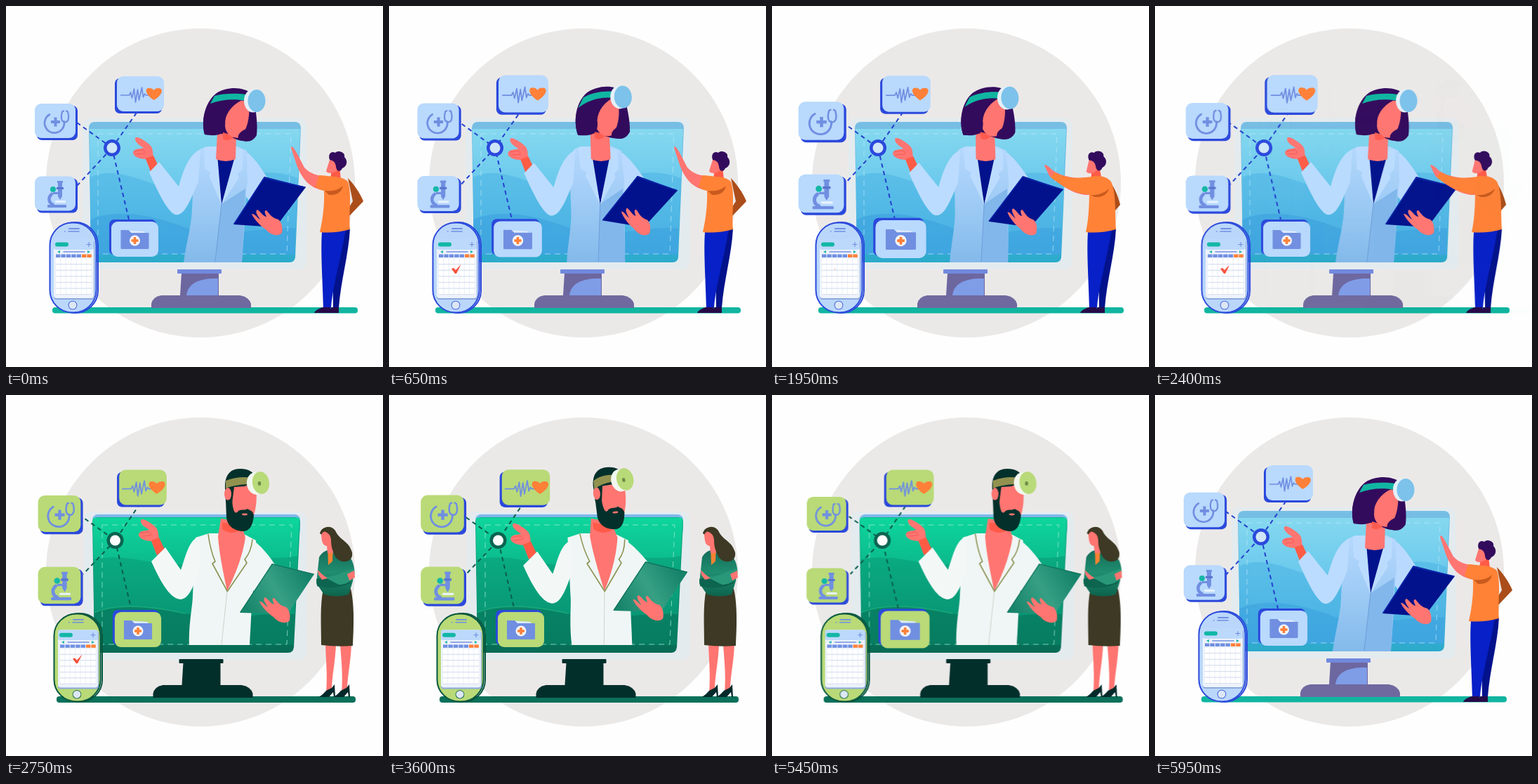
Recreate the animation shown at these times as an HTML page with a canvas. Size 537x514 px, loop 6 s.

```html
<!DOCTYPE html>
<html lang="en">
<head>
<meta charset="utf-8">
<title>Online doctor</title>
<style>
html, body { margin: 0; width: 100%; height: 100%; overflow: hidden; background: #fefefe; }
canvas { display: block; width: 537px; height: 514px; }
</style>
</head>
<body>
<canvas id="stage" width="537" height="514"></canvas>
<script>
const W = 537, H = 514, LOOP = 6000;
const stage = document.getElementById('stage').getContext('2d');
const layer = document.createElement('canvas');
layer.width = W; layer.height = H;
const c = layer.getContext('2d');

const clamp = v => Math.max(0, Math.min(1, v));
const ease = p => p * p * (3 - 2 * p);
const ramp = (t, a, b) => ease(clamp((t - a) / (b - a)));
const mod = (a, b) => ((a % b) + b) % b;
const pulse = (t, period) => Math.sin(Math.PI * t / period) ** 2;

// Blend two path strings that share one structure.
function morph(a, b, q) {
  const n = b.match(/-?[\d.]+/g);
  let i = 0;
  return a.replace(/-?[\d.]+/g, v => (+v + (n[i++] - v) * q).toFixed(2));
}
function grad(y0, y1, ...colors) {
  const g = c.createLinearGradient(0, y0, 0, y1);
  colors.forEach((k, i) => g.addColorStop(i / (colors.length - 1), k));
  return g;
}
function shape(fill, d) { c.fillStyle = fill; c.fill(new Path2D(d)); }
function line(color, w, d) {
  c.strokeStyle = color; c.lineWidth = w;
  c.lineCap = c.lineJoin = 'round';
  c.stroke(new Path2D(d));
}
function box(fill, x, y, w, h, r = 0) {
  c.fillStyle = fill; c.beginPath(); c.roundRect(x, y, w, h, r); c.fill();
}
function oval(fill, x, y, rx, ry = rx, rot = 0) {
  c.fillStyle = fill; c.beginPath(); c.ellipse(x, y, rx, ry, rot, 0, 7); c.fill();
}
function group(draw, ...m) {
  c.save();
  if (m.length) c.transform(...m);
  draw(); c.restore();
}
const shift = (dx, dy, draw) => group(draw, 1, 0, 0, 1, dx, dy);
function turn(x, y, deg, draw, dx = 0, dy = 0) {
  c.save();
  c.translate(x + dx, y + dy); c.rotate(deg * Math.PI / 180); c.translate(-x, -y);
  draw(); c.restore();
}

const ICON = '#708fe1', ORANGE = '#ff8038', SKIN = '#ff7571', EDGE = '#2b49dc';

const icons = {
  scope() {
    line(ICON, 2.6, 'M-8 -9 A14 14 0 1 0 13 3 L13 1');
    line(ICON, 2.2, 'M10 -13 C8 -6 8 1 14 2 C20 1 20 -6 18 -13 M10 -13 L12 -14 M18 -13 L16 -14');
    box(ICON, -6, -.5, 13, 4); box(ICON, -1.5, -5, 4, 13);
  },
  lens() {
    line(ICON, 4.5, 'M-5 1 C-10 5 -10 13 -3 16');
    box(ICON, -11, 16, 27, 4, 1);
    box('#e8f2fd', 0, 10, 15, 3, 1);
    shape(ICON, 'M3 -18 H11 V-15 H10 V4 L7 9 L4 4 V-15 H3 Z');
    box('#5875cf', 2, -9, 10, 3); box(ICON, -3, -2, 8, 3);
    oval('#14b8a6', -3, -6, 4);
  },
  heart() {
    line(ICON, 1.7, 'M-28 2 H-16 L-14 -2 L-12 6 L-9 -7 L-7 12 L-4 -6 L-2 9 L2 -9 L4 5 L6 0 L8 2 H12');
    shape(ORANGE, 'M19 9 C4 -1 7 -10 14 -8 Q17 -8 19 -5 Q21 -8 25 -8 C33 -9 33 1 19 9 Z');
  },
  folder() {
    shape('#dceafa', 'M-16 -13 L14 -11 V8 H-16 Z');
    shape(ICON, 'M-20 -13 H-9 L-5 -9 H20 V13 Q20 14 18 14 H-19 Q-20 14 -20 13 Z');
    oval('#f4f7fd', 0, 2, 7.5);
    box(ORANGE, -5, .2, 10, 3.6); box(ORANGE, -1.8, -3, 3.6, 10);
  }
};

function card(icon, x, y, w, h, sx, sy, size, fill) {
  group(() => {
    box(EDGE, -w / 2 + sx, -h / 2 + sy, w, h, 7);
    box(fill, -w / 2, -h / 2, w, h, 9);
    icons[icon]();
  }, size, 0, 0, size, x, y);
}

function links(x, y, ends, color, ring, core, t) {
  c.setLineDash([6, 5]); c.lineDashOffset = -t * .022;
  c.lineCap = 'butt'; c.strokeStyle = color; c.lineWidth = 2;
  for (const [ex, ey] of ends) {
    c.beginPath(); c.moveTo(ex, ey); c.lineTo(x, y); c.stroke();
  }
  c.setLineDash([]);
  oval(ring, x, y, 12); oval(core, x, y, 7.5);
}

function phone(x, y, tall, body, edge, from, to) {
  group(() => {
    c.strokeStyle = edge; c.lineWidth = 2;
    c.beginPath(); c.roundRect(5, 0, 64, 129, 32); c.stroke();
    box(body, 0, 0, 67, 129, 33);
    c.beginPath(); c.roundRect(.5, .5, 66, 128, 32); c.stroke();
    line(ICON, 1.8, 'M28 9 H42'); line(ICON, 1.6, 'M27 13 H42 M21.5 13 H22');
    box('#8ca9dc', 6, 25, 58, 85, 4);
    box('#edf2fb', 6, 24, 57, 84, 4);
    box('#bcd9fb', 6, 24, 57, 15, 3);
    box('#12b7a5', 8, 28.5, 19, 6, 3);
    line(ICON, 1.2, 'M56 28.5 V34.5 M53 31.5 H59');
    line(ICON, 1.5, 'M20 42 H50');
    shape('#12b7a5', 'M11 42 L15 40 V44 Z M58 42 L54 40 V44 Z');
    for (let i = 0; i < 7; i++) {
      const cx = 9 + i * 7.4;
      box(i > 4 ? ORANGE : ICON, cx, 45.5, 6.4, 4.5);
      for (let j = 0; j < 6; j++) box('#fff', cx, 52 + j * 8.6, 6.2, 7.2, 1);
    }
    c.strokeStyle = '#d3dbe8'; c.lineWidth = .8;
    for (let j = 1; j < 7; j++) {
      c.beginPath(); c.moveTo(9, 51 + j * 8.6); c.lineTo(60, 51 + j * 8.6); c.stroke();
    }
    if (to > from) group(() => {
      c.beginPath(); c.rect(26 + from * 16, 55, (to - from) * 16, 22); c.clip();
      shape('#f7503c', 'M27 66 L30 65 L33 68 L40.5 60 L34 73 L32 73 Z');
    });
    oval(edge, 33, 118, 6.3); oval('#dce7f3', 33, 118, 5.5);
  }, 1, 0, 0, tall, x, y);
}

function stand(x, y, bar, neck, base, shine) {
  shift(x, y, () => {
    shape(base, 'M0 18 V12 Q2 2 14 0 H126 Q139 2 142 12 V18 Z');
    shape(neck, 'M43 -32 H96 V0 H41 Z');
    if (shine) shape(shine, 'M95 -24 C70 -25 52 -18 50 0 H95 Z');
    box(bar, 37, -37, 63, 6, 1);
  });
}

function inset(d, color) {
  c.setLineDash([8, 6]); c.lineDashOffset = 0;
  c.strokeStyle = color; c.lineWidth = 1;
  c.stroke(new Path2D(d));
  c.setLineDash([]);
}

const POINT = 'M184 188 C187 184 200 193 206 199 C210 204 209 212 210 216 L218 230 L207 238 L199 218 C190 218 180 214 181 208 C184 202 190 204 196 202 C190 198 183 194 184 188 Z';
const GRIP = 'M350 296 C354 295 358 302 362 304 C358 298 354 292 358 290 C363 293 367 300 371 300 C369 295 367 291 371 291 C376 297 379 302 388 304 C394 309 394 318 393 323 C388 329 376 326 370 318 C362 313 353 303 350 296 Z';

function pointHand() {
  shape(SKIN, POINT);
  shape('#ff5b45', 'M199 217 L210 213 L218 230 L207 238 Z');
  line('#f45c58', 1, 'M183 207 L194 205 Q200 207 198 210 L186 211');
}

// The torso leans from the hem, so the shift grows with height.
function lean(q, draw) {
  const k = 22 * q / 162;
  group(draw, 1, 0, k, 1, -k * 362, 0);
}

function womanDoctor(q) {
  lean(q, () => {
    shape('#b9dafe', 'M336 204 C350 210 362 228 374 248 L358 292 L339 268 Z');
    shape(grad(200, 364, '#b6d8fd', '#9ecbf5', '#83baeb'), 'M276 204 L286 200 H330 L343 206 L344 250 C340 275 342 295 336 365 H253 C257 335 264 315 265 290 L268 220 Z');
    shape('#82b7eb', 'M307 282 L341 260 L336 365 H297 Z');
    line('#6f9edc', 1, 'M307 282 L298 364');
    shape('#02128c', 'M299 214 H327 L307 283 Z');
    shape('#bcdcff', 'M282 201 L300 200 L307 283 L289 241 L292 237 L283 232 Z');
    shape('#bcdcff', 'M326 203 L338 205 L337 232 L330 239 L332 244 L307 283 L325 218 Z');
    shape(SKIN, 'M301 181 L328 178 L327 218 Q313 224 299 218 Z');
  });
  shift(-20 * q, 2 * q, () => {
    pointHand();
    shape('#bbdcff', 'M277 204 C260 211 252 236 246 257 L218 222 L204 237 C216 264 230 293 241 297 C255 300 264 273 274 250 Z');
  });
  turn(318, 155, -8 * q, () => {
    shape('#330b5d', 'M283 183 C277 160 285 135 300 124 C314 115 339 114 351 126 C356 145 359 169 357 184 C352 194 337 194 326 189 L309 182 Z');
    shift(-4 * q, 0, () => {
      shape('#ff5c50', 'M309 180 L326 185 Q316 195 309 189 Z');
      shape(SKIN, 'M313 145 C318 133 341 131 346 140 C348 160 342 180 333 187 C323 190 312 182 312 170 Z');
    });
    shape('#330b5d', 'M283 183 C277 160 285 138 300 134 L341 132 C325 138 314 150 312 164 C313 174 309 182 303 183 C296 185 290 184 283 183 Z');
    shape('#330b5d', 'M348 148 C349 160 348 169 342 175 C332 179 327 187 334 191 C350 197 359 187 355 176 Z');
    shift(-10 * q, -2 * q, () => {
      shape('#10b6a2', morph('M297 128 C310 124 329 124 342 126 L341 135 C325 132 307 133 291 139 Z',
        'M303 134 C313 127 329 124 342 126 L341 135 C325 132 307 137 293 150 Z', q));
      oval('#e4f0f7', 352, 135, 13, 16.5); oval('#7cc2eb', 357, 135, 12.5, 16);
    });
  }, -28 * q, -3 * q);
  turn(376, 282, 9.5 * q, () => {
    shape('#02128c', 'M368 243 L427 258 L384 315 L324 311 Z');
    line('#0d27ad', 1.4, 'M369 245 L426 258 M368 244 L325 310');
    shape(SKIN, GRIP);
  }, -31 * q, -q);
}

function manDoctor(q) {
  lean(q, () => {
    shape('#f0f6f5', 'M346 203 C362 212 376 230 386 246 L365 293 L345 270 Z');
    shape('#f0f6f5', 'M270 203 L289 197 H337 L356 207 L357 250 C349 285 350 315 347 356 H261 C260 325 266 300 266 285 Z');
    shape(SKIN, 'M306 176 L334 180 L341 203 C336 235 323 263 315 279 C309 252 303 220 302 201 Z');
    shape('#ff5a49', 'M308 181 L333 187 L333 193 Q320 200 308 191 Z');
    line('#8d9254', 1.6, 'M288 198 Q291 221 298 237 L294 240 L315 279');
    line('#8d9254', 1.6, 'M351 206 Q349 224 340 234 L343 239 L315 280');
    line('#c9d5cc', 1, 'M315 280 L307 355');
  });
  shift(-22 * q, 8 * q, () => {
    shift(8, -10, pointHand);
    shape('#f3f8f7', 'M275 202 C260 205 255 234 249 249 L227 217 L207 237 C219 263 232 289 248 291 C261 291 268 270 276 248 Z');
  });
  turn(322, 190, -7 * q, () => {
    shape(SKIN, 'M316 128 H355 C359 146 356 170 348 181 L322 179 Z');
    shape('#03302b', 'M312 133 C311 116 318 105 333 105 C347 105 356 111 356 122 L340 130 L325 131 L322 154 L313 152 Z');
    oval(SKIN, 316, 141, 5, 9);
    shape('#03302b', 'M313 150 L322 149 C323 164 326 172 331 165 C335 162 341 165 344 162 C348 165 351 164 353 171 C352 184 348 193 339 194 C326 194 315 187 314 174 Z');
    oval(SKIN, 340, 170, 4, 1.4);
    shift(-7 * q, -q, () => {
      shape('#92924f', morph('M313 122 C326 117 339 116 350 118 V127 C338 127 325 128 313 133 Z',
        'M320 124 C328 117 339 116 350 118 V127 C338 127 328 130 320 136 Z', q));
      oval('#f2f8ef', 356, 126, 13, 16, -.15); oval('#b9da79', 363, 125, 12, 16, -.15);
      oval('#6f8c45', 361, 126, 2.3, 3);
    });
  }, -22 * q, -2 * q);
  shift(-19 * q, -4 * q, () => {
    const g = c.createLinearGradient(340, 300, 425, 250);
    g.addColorStop(0, '#18856b'); g.addColorStop(.5, '#37a084'); g.addColorStop(1, '#15836a');
    shape(g, 'M379 240 L439 255 L401 312 L333 310 Z');
    line('#0a7059', 1.2, 'M380 241 L438 255 M379 241 L334 309');
    shift(11, -2, () => shape(SKIN, GRIP));
  });
}

function visitor(r) {
  shape('#ab4d1a', morph('M487 245 C494 252 505 267 509 278 L489 299 L484 294 L494 278 Z',
    'M484 254 C489 261 494 274 496 283 L489 291 L483 287 L487 278 Z', r));
  shape('#03128b', 'M466 322 L490 317 C488 355 477 390 474 430 H466 L465 360 Z');
  shape('#0720c7', 'M450 322 L484 318 C477 360 465 400 463 430 H452 C451 390 448 350 450 322 Z');
  shape('#260a48', 'M451 429 H462 V437 H439 Q441 432 451 429 Z M464 429 H474 V437 H460 Q460 432 464 429 Z');
  turn(468, 240, -4 * r, () => {
    shape('#ff5b47', 'M464 231 L475 229 L477 247 H462 Z');
    shape(SKIN, 'M461 219 C467 214 475 218 475 228 C472 239 458 240 456 235 Z');
    shape('#330b5d', 'M461 219 C458 210 464 206 469 209 C474 204 484 209 482 215 C488 221 485 229 479 231 C476 238 470 235 470 228 Q469 220 461 219 Z');
  }, -8 * r);
  shape('#ff8236', morph('M452 249 C460 239 480 243 487 250 C493 268 488 295 490 318 Q468 324 447 322 C452 300 455 275 452 249 Z',
    'M452 249 C460 239 475 241 483 250 C491 268 488 295 490 318 Q468 324 447 322 C452 300 452 275 452 249 Z', r));
  shape('#c95a1e', morph('M454 263 C465 264 474 262 480 256 Q477 270 460 269 Z',
    'M454 269 C464 270 474 266 480 260 Q476 273 460 272 Z', r));
  shape(SKIN, morph('M406 202 C407 197 411 204 414 209 L425 230 C433 239 444 242 458 243 L457 263 C437 262 421 250 412 220 Z',
    'M388 227 C389 224 396 230 401 235 L411 240 C424 244 434 246 447 244 L452 269 C432 270 414 257 395 242 Z', r));
  shape('#ff8236', morph('M446 241 C458 242 472 242 480 249 C482 257 471 264 453 263 C447 262 444 259 441 257 Z',
    'M402 237 C424 247 438 246 460 242 C474 244 482 253 474 264 C449 274 426 266 397 244 Z', r));
}

function visitorB(r) {
  shape(SKIN, 'M455 355 H470 C469 382 464 400 464 421 L456 424 C458 400 456 382 455 355 Z');
  shape(SKIN, 'M476 355 H492 C491 382 486 400 486 421 L478 424 C480 400 478 382 476 355 Z');
  for (const x of [0, 21]) shape('#03292a', `M${456 + x} 421 L${464 + x} 417 L${468 + x} 412 L${469 + x} 430 H${467 + x} L${466 + x} 423 L${460 + x} 430 H${446 + x} Q${451 + x} 427 ${456 + x} 421 Z`);
  shape('#3d3924', 'M452 276 H491 C497 300 495 335 494 357 Q472 359 449 356 C449 325 447 300 452 276 Z');
  shape(grad(220, 285, '#136c58', '#208d70', '#0d654e'), 'M446 231 C451 221 462 219 470 220 C484 222 494 231 496 247 L494 265 L488 284 Q471 289 453 284 L442 268 Z');
  shape('#3d3924', morph('M447 197 C449 187 463 184 469 193 C476 208 488 207 493 224 C495 237 482 240 474 235 C466 230 466 219 461 208 Z',
    'M461 204 C464 184 481 181 488 192 C492 207 496 212 498 227 C499 242 487 245 480 240 C471 232 469 224 460 220 Z', r));
  shift(8 * r, 0, () => shape('#f58233', 'M458 212 L466 215 L465 237 L459 242 Z'));
  shape(SKIN, morph('M449 199 C453 191 461 194 464 203 L466 225 H458 L457 215 C450 214 450 208 449 199 Z',
    'M466 196 C468 188 477 189 480 197 L477 214 H469 L469 211 C466 208 465 204 466 196 Z', r));
  shape('#3d3924', morph('M450 193 C458 186 469 191 469 204 C473 217 481 225 477 235 C466 229 463 217 463 207 C463 199 458 195 450 193 Z',
    'M467 191 C475 183 485 188 487 202 C490 217 493 227 489 238 C478 231 477 218 479 207 C481 198 476 190 467 191 Z', r));
  shape('#0d654f', 'M442 262 C454 259 470 263 488 258 L491 268 C475 275 458 277 443 272 Z');
  shape('#289879', 'M449 257 C464 263 480 251 496 247 C499 261 488 270 474 270 Z');
  shape(SKIN, 'M444 249 L450 255 L458 261 L450 263 L445 256 Z');
  shift(5 * r, 3 * r, () => shape(SKIN, 'M486 255 L496 250 L497 260 L489 264 Z'));
}

function sceneA(t) {
  const q = ramp(t, 100, 1100) * (1 - ramp(t, 1600, 2250));
  const r = ramp(t, 680, 1450);
  box('#e3ebef', 109, 160, 319, 215, 10);
  shape(grad(165, 364, '#78bee4', '#55b7e0', '#2baacb'), 'M127 165 H411 Q420 165 420 174 L412 358 Q411 365 404 365 H130 Q122 365 121 357 L118 174 Q118 165 127 165 Z');
  group(() => {
    c.clip(new Path2D('M119 175 H419 L411 354 H121 Z'));
    box(grad(175, 354, '#85d8ef', '#67c7ec', '#46afe4'), 116, 175, 306, 182);
    shape('rgba(68,174,224,.45)', 'M116 245 C170 220 210 270 270 258 C330 244 375 225 422 248 V360 H116 Z');
    shape('rgba(56,157,222,.5)', 'M116 306 C160 285 215 300 260 317 C320 334 365 310 422 318 V360 H116 Z');
  });
  inset('M131 182 H406 L400 353 H131 Z', 'rgba(185,232,250,.7)');
  box('#10b5a0', 66, 429, 435, 8.5, 4);
  stand(207, 412, '#7189dd', '#6d67a0', '#70699f', '#7f9ce7');
  links(151, 202, [[101, 166], [101, 256], [186, 152], [175, 304]], '#2441ce', EDGE, '#cfe6f8', t);
  womanDoctor(q);
  const side = 1 + .13 * pulse(t, 750), fill = '#b9d9fd';
  const beat = mod(t, 1800) < 900 ? pulse(t, 900) : 0;
  card('scope', 70, 163.5, 58, 49, 3, 3, side, fill);
  card('lens', 70, 267, 58, 49, 3, 3, side, fill);
  card('heart', 191.5, 125, 67, 50, -3, 3, 1 + .1 * beat, fill);
  card('folder', 183.5, 332, 67, 50, -3, -3, 1 + .08 * pulse(t, 800), fill);
  const first = t < 1600;
  phone(62, 308, 1, '#bad7fb', EDGE, first ? ramp(t, 900, 1500) : 0,
    first ? ramp(t, 250, 650) : ramp(t, 1750, 2650));
  visitor(r);
}

function sceneB(t) {
  const q = ramp(t, 2950, 3950) * (1 - ramp(t, 4850, 5400));
  const r = ramp(t, 3850, 4500) * (1 - ramp(t, 4850, 5350));
  box('#e3ebef', 111, 166, 317, 211, 10);
  box('#80b8ec', 123, 170, 296, 30, 8);
  shape(grad(174, 366, '#0bb98b', '#0a896a', '#076b55'), 'M130 174 H412 Q419 174 419 182 L410 359 Q409 367 402 367 H134 Q126 367 126 360 L123 182 Q123 174 130 174 Z');
  group(() => {
    c.clip(new Path2D('M124 175 H418 L409 356 H126 Z'));
    box(grad(175, 356, '#0ed69d', '#0baf86', '#08836a'), 120, 175, 302, 184);
    shape('rgba(8,151,117,.5)', 'M120 235 C180 220 225 255 285 235 C330 220 370 240 422 228 V360 H120 Z');
    shape('rgba(7,112,86,.55)', 'M120 312 C155 295 205 300 255 311 C315 325 365 306 422 313 V360 H120 Z');
    line('rgba(31,178,127,.7)', 1.5, 'M120 312 C155 295 205 300 255 311');
  });
  inset('M137 185 H407 L400 355 H137 Z', 'rgba(160,235,204,.75)');
  box('#0b705a', 72, 429, 426, 9, 4);
  stand(209.5, 413, '#032f2b', '#032f2b', '#032f2b');
  links(155.5, 207, [[108, 173], [110, 255], [188, 159], [178, 303]], '#0b5d4e', '#0b6350', '#fbfdfc', t);
  manDoctor(q);
  const beat = pulse(t - 3225, 750), fill = '#b9da77';
  card('scope', 76, 169, 56, 48, 3, 3, 1 + .1 * beat, fill);
  card('lens', 76, 271, 57, 49, 3, 3, 1 + .08 * beat, fill);
  card('heart', 195, 131.5, 65, 48, -3, 3, 1 + .07 * pulse(t - 3000, 900), fill);
  card('folder', 188, 334, 66, 50, -3, -3, 1 + .08 * pulse(t - 3600, 800), fill);
  const first = t < 3700;
  phone(68, 311, .977, '#b9da77', '#07573f', first ? ramp(t, 3250, 3580) : ramp(t, 5200, 5480),
    first ? 1 : ramp(t, 3850, 4500));
  visitorB(r);
}

function show(draw, t, dx, alpha) {
  if (alpha <= 0) return;
  c.clearRect(0, 0, W, H);
  draw(t);
  stage.globalAlpha = alpha;
  stage.drawImage(layer, dx, 0);
  stage.globalAlpha = 1;
}

function frame(now) {
  const t = now % LOOP;
  stage.fillStyle = '#fefefe';
  stage.fillRect(0, 0, W, H);
  stage.fillStyle = '#ebe9e8';
  stage.beginPath(); stage.arc(277, 252, 220, 0, 7); stage.fill();

  const back = t > 4000;
  const p = clamp((t - (back ? 5407 : 2330)) / 400);
  const fade = ease(p) ** 2;
  const a = [sceneA, back ? t - LOOP : t], b = [sceneB, t];
  const [out, into] = back ? [b, a] : [a, b];
  show(...out, 130 * p * p, 1 - fade);
  show(...into, 130 * (1 - p) ** 2, fade);
}

const start = performance.now();
function tick() {
  frame(performance.now() - start);
  requestAnimationFrame(tick);
}
tick();
</script>
</body>
</html>
```
